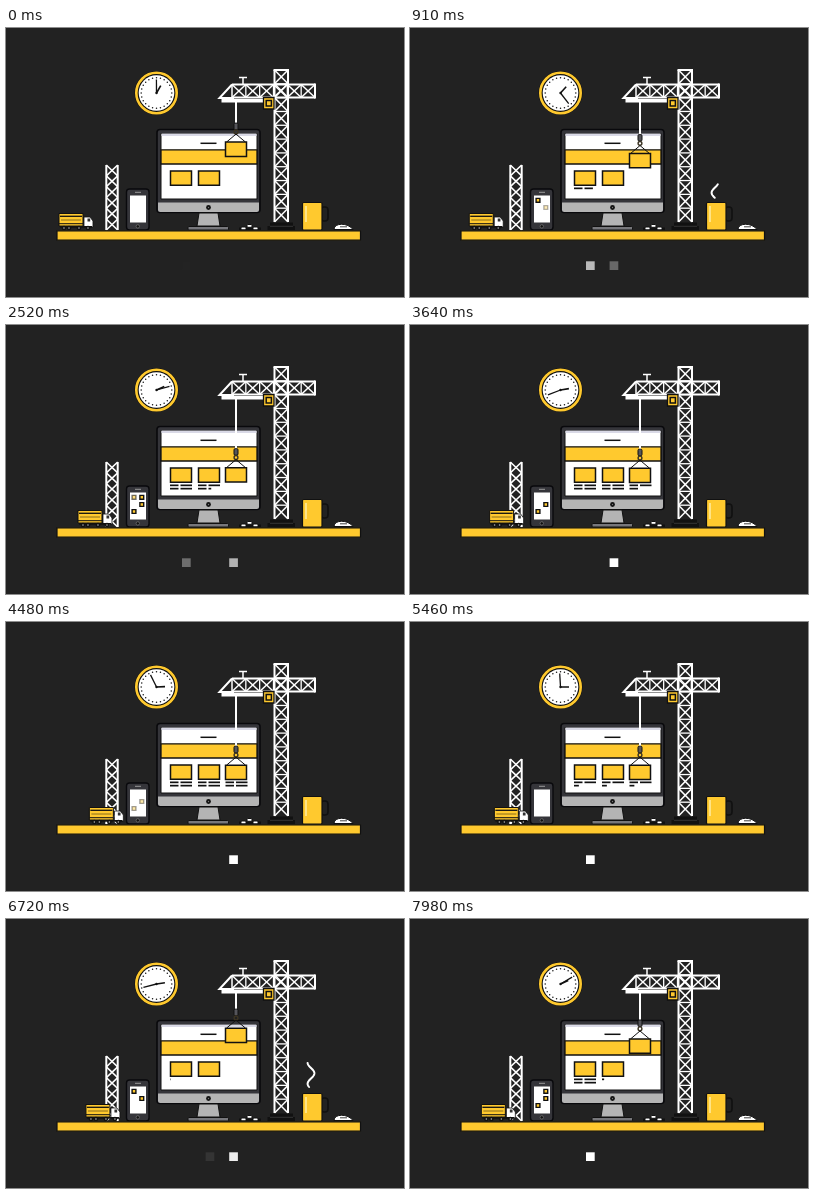
Recreate the animation shown at these times as an HTML page with a canvas. Size 398x269 px, loop 8 s.

```html
<!DOCTYPE html>
<html lang="en">
<head>
<meta charset="utf-8">
<title>Under construction</title>
<style>
  html, body { margin: 0; width: 100%; height: 100%; overflow: hidden; background: #222; }
  canvas { display: block; width: 398px; height: 269px; }
</style>
</head>
<body>
<canvas id="stage" width="398" height="269"></canvas>
<script>
const ctx = document.getElementById('stage').getContext('2d');
const LOOP = 8000, CYCLE = 5200;
const BG = '#222', INK = '#111', YELLOW = '#ffc92e', WHITE = '#fff', GREY = '#b4b4b4', DARK = '#35353a';

const clamp = (v, lo = 0, hi = 1) => Math.min(hi, Math.max(lo, v));
const ramp = (t, start, length) => clamp((t - start) / length);
const smooth = u => u * u * (3 - 2 * u);
const mix = (a, b, u) => a + (b - a) * u;

function fill(color) { ctx.fillStyle = color; ctx.fill(); }
function stroke(color, width = 1) { ctx.strokeStyle = color; ctx.lineWidth = width; ctx.stroke(); }
function paint(color, line, width) {
  if (color) fill(color);
  if (line) stroke(line, width);
}
function box(x, y, w, h, color, line, width = 1, r = 0) {
  ctx.beginPath();
  ctx.roundRect(x, y, w, h, r);
  paint(color, line, width);
}
function disc(x, y, r, color, line, width = 1) {
  ctx.beginPath();
  ctx.arc(x, y, r, 0, 7);
  paint(color, line, width);
}
function trace(points, close) {
  ctx.beginPath();
  points.forEach(([x, y]) => ctx.lineTo(x, y));
  if (close) ctx.closePath();
}
function line(color, width, ...points) { trace(points); stroke(color, width); }
function shape(points, color, edge, width) { trace(points, true); paint(color, edge, width); }

// Crossed braces inside a row of equal cells
function lattice(x, y, w, h, cells, vertical, bars = true) {
  const cw = vertical ? w : w / cells, ch = vertical ? h / cells : h;
  for (let i = 0; i < cells; i++) {
    const a = vertical ? x : x + i * cw, b = vertical ? y + i * ch : y;
    line(WHITE, 1.5, [a, b], [a + cw, b + ch]);
    line(WHITE, 1.5, [a + cw, b], [a, b + ch]);
    if (bars && i) line(WHITE, 1.3, [a, b], vertical ? [a + cw, b] : [a, b + ch]);
  }
  if (vertical) {
    line(WHITE, 2, [x, y], [x, y + h]);
    line(WHITE, 2, [x + w, y], [x + w, y + h]);
  } else {
    line(WHITE, 2, [x, y], [x + w, y]);
    line(WHITE, 2, [x, y + h], [x + w, y + h]);
  }
}

// Shared swing of the clock and the truck: 1 at rest point, 0 at the loop start
function travel(t) {
  return 1 - smooth(Math.abs(t - 5210) / 6900) * 1.178;
}

function clock(p) {
  const x = 150.5, y = 65, angle = p * 4 * Math.PI;
  disc(x, y, 22, INK);
  disc(x, y, 20.2, INK, YELLOW, 2.6);
  disc(x, y, 17.8, WHITE);
  for (let i = 0; i < 24; i++) {
    const a = i * Math.PI / 12;
    disc(x + 15.3 * Math.sin(a), y - 15.3 * Math.cos(a), 0.75, INK);
  }
  const hand = (a, length, width) =>
    line(INK, width, [x, y], [x + length * Math.sin(a), y - length * Math.cos(a)]);
  hand(angle, 13.5, 1.3);
  hand(Math.PI / 6 + angle / 12, 8.5, 1.6);
  disc(x, y, 1.2, INK);
}

function table() {
  box(51, 202.8, 303.5, 9.4, YELLOW, INK, 1.2);
}

function monitor(t) {
  box(151, 101.5, 103, 83, DARK, '#09090c', 1.6, 3);
  ctx.beginPath();
  ctx.roundRect(152, 174.5, 101, 9.5, [0, 0, 2.5, 2.5]);
  fill(GREY);
  disc(202.5, 179.5, 2.4, INK);
  disc(202.5, 179.5, 0.7, '#777');
  shape([[193, 185], [212, 185], [214, 198], [191, 198]], GREY, INK, 1);
  box(182, 198.5, 40.5, 3.5, '#77777b', INK, 1, 1);

  box(155, 105.5, 96, 65.5, WHITE, INK, 1);
  box(155.5, 105.5, 95, 2.6, '#d9d9e6');
  line(INK, 1.5, [194.5, 115.3], [210.5, 115.3]);
  box(155, 121.8, 96, 14.2, YELLOW, INK, 1.3);
  for (const x of [164, 192]) card(x, 143);

  const second = t >= 6250, local = second ? t - 6250 : t;
  const erased = second ? 0 : 44 * ramp(t, 5200, 670);
  [164, 192, 219.5].forEach((x, i) => {
    const typed = 44 * ramp(local, 460 + i * 1220, 1050) - erased;
    captions(x, typed);
  });
}

function card(x, y) { box(x + 0.5, y, 21, 14.3, YELLOW, INK, 1.5); }

function captions(x, typed) {
  for (let row = 0; row < 2; row++) {
    const end = clamp(typed - row * 22, 0, 22);
    for (const [from, to] of [[0, 8.5], [10.5, 22]]) {
      if (end > from) box(x + from, 159.5 + row * 3.3, Math.min(to, end) - from, 1.7, INK);
    }
  }
}

function crane() {
  lattice(268.5, 42, 13.5, 152, 11, true);
  line(WHITE, 2, [267.5, 42], [283, 42]);
  lattice(226, 56.5, 83, 13, 6, false);
  line(WHITE, 2, [309, 55.5], [309, 70.5]);
  line(WHITE, 2, [226, 56.5], [213.5, 70], [228, 70]);
  line(WHITE, 1.5, [226, 56.5], [226, 70]);
  box(215.5, 71, 43, 3.4, WHITE);
  line(WHITE, 1.5, [237, 49.5], [237, 56]);
  line(WHITE, 1.5, [233, 49.5], [241, 49.5]);
  box(257.5, 69.5, 10.5, 11.5, YELLOW, INK, 1.3);
  box(260.2, 72.5, 5.2, 5.5, YELLOW, INK, 1.5);
  box(264, 194.5, 23, 4, INK);
  box(261.5, 198, 27.5, 4.3, INK);
  line('#444', 0.7, [264, 198.3], [287, 198.3]);
}

function loadHeight(t) {
  const fall = start => 109 + 34.2 * smooth(ramp(t, start, 3700));
  if (t < 5550) return fall(-900);
  if (t < 6580) return mix(143.2, 109, smooth(ramp(t, 5550, 1030)));
  return fall(6580);
}

function load(y) {
  line(WHITE, 2, [230, 74], [230, y - 18]);
  box(228, y - 19, 4, 6.5, '#55555a', INK, 1, 1.2);
  disc(230, y - 10.2, 1.9, null, '#3b3322', 1.4);
  line(INK, 1, [220.5, y], [230, y - 8], [239.5, y]);
  card(219, y);
}

function tower() {
  lattice(100.3, 137, 11.4, 65, 6, true, false);
}

function phone(t) {
  const p = t % CYCLE;
  box(120.5, 161, 22.5, 41, DARK, '#09090c', 1.4, 3);
  line('#999', 1, [129, 164.3], [135, 164.3]);
  box(124, 167.5, 16, 27, WHITE);
  disc(131.8, 198.4, 1.7, INK, '#777', 0.7);
  const tile = (x, y, on, off) => {
    ctx.globalAlpha = ramp(p, on, 250) * (1 - ramp(p, off, 300));
    box(x - 1.9, y - 1.9, 3.8, 3.8, YELLOW, INK, 1.4);
  };
  tile(128, 172.3, 550, 2400);
  tile(135.8, 179.5, 830, 4300);
  tile(135.8, 172.3, 1800, 3100);
  tile(128, 186.5, 2150, 4300);
  ctx.globalAlpha = 1;
}

function truck(x) {
  box(x, 185.5, 24, 12.5, YELLOW, INK, 1);
  line(INK, 1.3, [x + 1, 188.3], [x + 23, 188.3]);
  line('#6b5518', 0.8, [x + 2, 192], [x + 22, 192]);
  line(INK, 1, [x, 195.7], [x + 24, 195.7]);
  shape([[x + 25, 189], [x + 31, 189], [x + 34, 193], [x + 34, 199], [x + 25, 199]], WHITE, INK, 0.8);
  box(x + 28.5, 190.5, 2.7, 3, '#333');
  box(x + 1, 198, 32, 1.8, INK);
  for (const dx of [5, 10, 20, 29]) {
    disc(x + dx, 200, 2.3, INK);
    disc(x + dx, 200, 0.8, GREY);
  }
}

function deskItems() {
  ctx.beginPath();
  ctx.roundRect(315, 179, 7, 14, 3);
  stroke(INK, 1.6);
  box(296.5, 174.5, 19.5, 27.5, YELLOW, INK, 1.2, 1);
  line('#fff0ad', 1.4, [300, 178], [300, 194]);

  ctx.beginPath();
  ctx.moveTo(328, 201.5);
  ctx.bezierCurveTo(328, 194.5, 342, 194.5, 347, 201.5);
  ctx.closePath();
  paint(WHITE, INK, 1);
  line(INK, 0.8, [334, 198.8], [341, 198.8]);

  box(233, 199.5, 22, 2.8, INK);
  for (const [x, y] of [[235, 199], [241, 196.5], [247, 199]]) {
    box(x, y, 5, 2.8, WHITE, INK, 1, 1);
  }
}

function steam(t) {
  const p = t % CYCLE;
  const head = 170 - 26 * ramp(p, 250, 1250), tail = 170 - 26 * ramp(p, 1450, 1000);
  if (tail - head < 0.5) return;
  const points = [];
  for (let y = head; y <= tail; y += 0.5) {
    points.push([305 + 3.4 * Math.sin((y - 149) / 21 * 2 * Math.PI), y]);
  }
  ctx.lineCap = 'round';
  line(WHITE, 2, ...points);
  ctx.lineCap = 'butt';
}

// Three squares hand the light on every 800 ms with a crossfade
function loader(t) {
  const step = Math.floor(t / 800), u = ramp(t % 800, 0, 350);
  const square = (i, alpha) => {
    ctx.globalAlpha = alpha;
    box(176 + 23.6 * (i % 3), 233.3, 8.7, 8.7, WHITE);
  };
  square(step, u);
  if (step) square(step + 2, 1 - u);
  ctx.globalAlpha = 1;
}

function draw(now) {
  const t = now % LOOP, p = travel(t);
  ctx.fillStyle = BG;
  ctx.fillRect(0, 0, 398, 269);
  clock(p);
  tower();
  monitor(t);
  crane();
  load(loadHeight(t));
  truck(mix(53, 84.5, p));
  phone(t);
  deskItems();
  steam(t);
  table();
  loader(t);
}

const start = performance.now();
function tick() {
  draw(performance.now() - start);
  requestAnimationFrame(tick);
}
tick();
</script>
</body>
</html>
```
